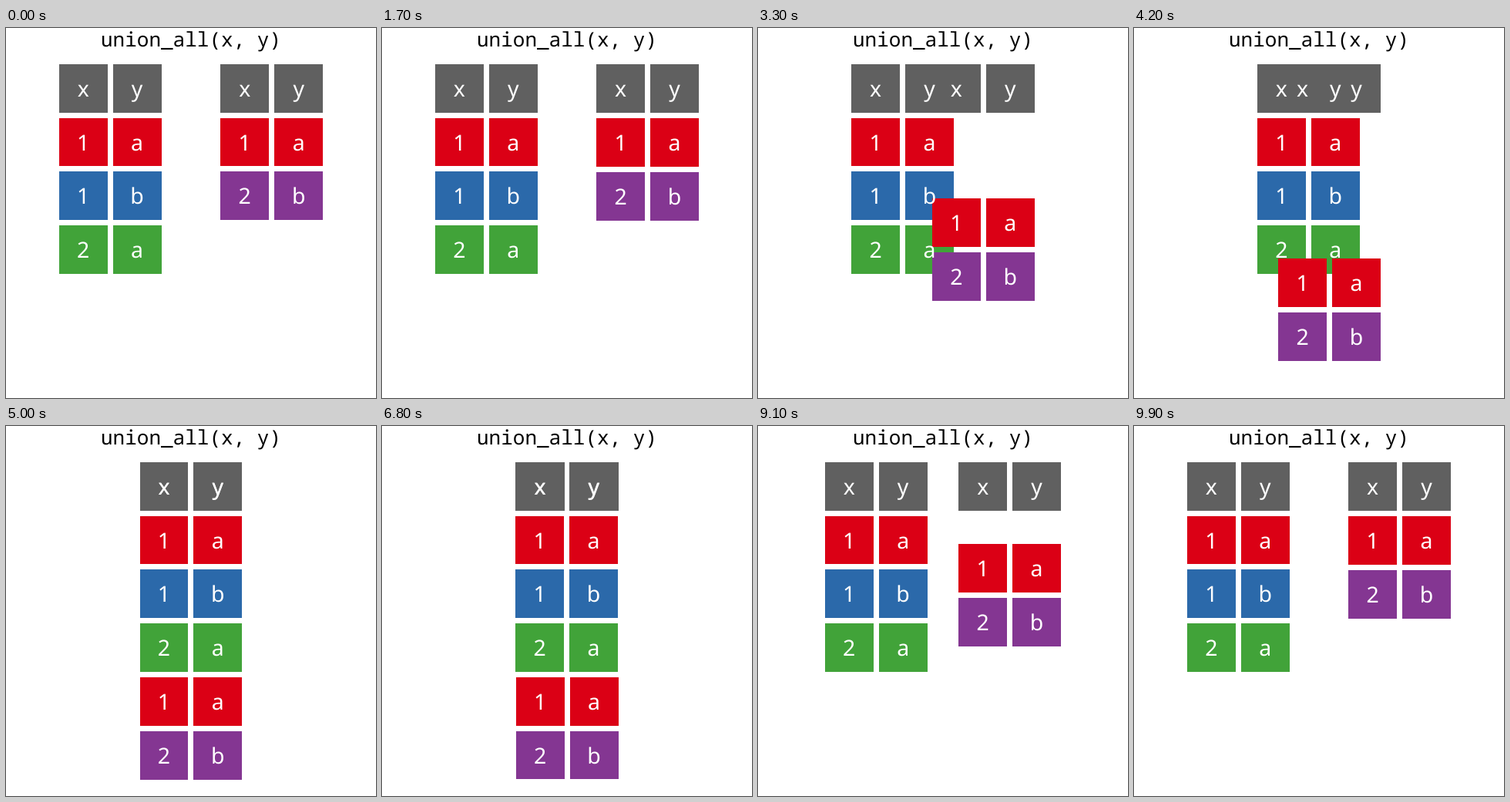
An HTML page for the animation above (10 s loop, 480 by 480 pixels).

```html
<!DOCTYPE html>
<html lang="en">
<head>
<meta charset="utf-8">
<title>union_all</title>
<style>
  html, body { margin: 0; width: 100%; height: 100%; overflow: hidden; background: #fff; }
  svg { display: block; width: 100%; height: 100%; }
  text { text-anchor: middle; text-rendering: geometricPrecision; }
  .title { font: 26px "Noto Sans Mono", "DejaVu Sans Mono", monospace; fill: #000; }
  .cell { font: 28.5px "Noto Sans", "Open Sans", sans-serif; fill: #fff; }
</style>
</head>
<body>
<svg viewBox="0 0 480 480">
  <text class="title" x="240" y="24" xml:space="preserve">union_all(x, y)</text>
  <g id="tiles" shape-rendering="crispEdges"></g>
  <g id="labels"></g>
</svg>
<script>
const LOOP = 10000, STEP = 100;
const PITCH = 69.87, SIZE = 62.95, TOP = 46.65;
const MID = 173.5, SPREAD = 1.5 * PITCH, DROP = 3 * PITCH;
const GREY = '#606060', RED = '#db0015', BLUE = '#2b69aa', GREEN = '#41a339', PURPLE = '#843692';

const left = [['xy', GREY], ['1a', RED], ['1b', BLUE], ['2a', GREEN]];
const right = [['xy', GREY], ['1a', RED], ['2b', PURPLE]];

function add(parent, tag, attrs) {
  const el = document.createElementNS('http://www.w3.org/2000/svg', tag);
  for (const key in attrs) el.setAttribute(key, attrs[key]);
  return document.getElementById(parent).appendChild(el);
}

// side: -1 for the left table, 1 for the right one
function makeCells(rows, side) {
  return rows.flatMap(([chars, fill], row) => [...chars].map((char, col) => {
    const tile = add('tiles', 'rect', { fill });
    const label = add('labels', 'text', { class: 'cell' });
    label.textContent = char;
    return { side, row, col, tile, label };
  }));
}

const cells = [...makeCells(left, -1), ...makeCells(right, 1)];

const sineInOut = u => (1 - Math.cos(Math.PI * u)) / 2;

// 0: tables apart, 1: tables stacked
function merge(t) {
  if (t < 1600) return 0;
  if (t < 5000) return sineInOut((t - 1600) / 3400);
  if (t < 6700) return 1;
  return sineInOut((LOOP - t) / 3300);
}

function place({ side, row, col, tile, label }, p) {
  const x = MID + side * SPREAD * (1 - p) + col * PITCH;
  const y = TOP + row * PITCH + (side > 0 && row > 0 ? DROP * p : 0);
  const x0 = Math.round(x), y0 = Math.round(y);
  tile.setAttribute('x', x0);
  tile.setAttribute('y', y0);
  tile.setAttribute('width', Math.round(x + SIZE) - x0);
  tile.setAttribute('height', Math.round(y + SIZE) - y0);
  label.setAttribute('x', x + SIZE / 2);
  label.setAttribute('y', y + SIZE / 2 + 10.6);
}

function draw(time) {
  const t = Math.floor((time % LOOP) / STEP) * STEP;
  const p = merge(t);
  cells.forEach(cell => place(cell, p));
}

const start = performance.now();
function tick() {
  draw(performance.now() - start);
  requestAnimationFrame(tick);
}
tick();
</script>
</body>
</html>
```
